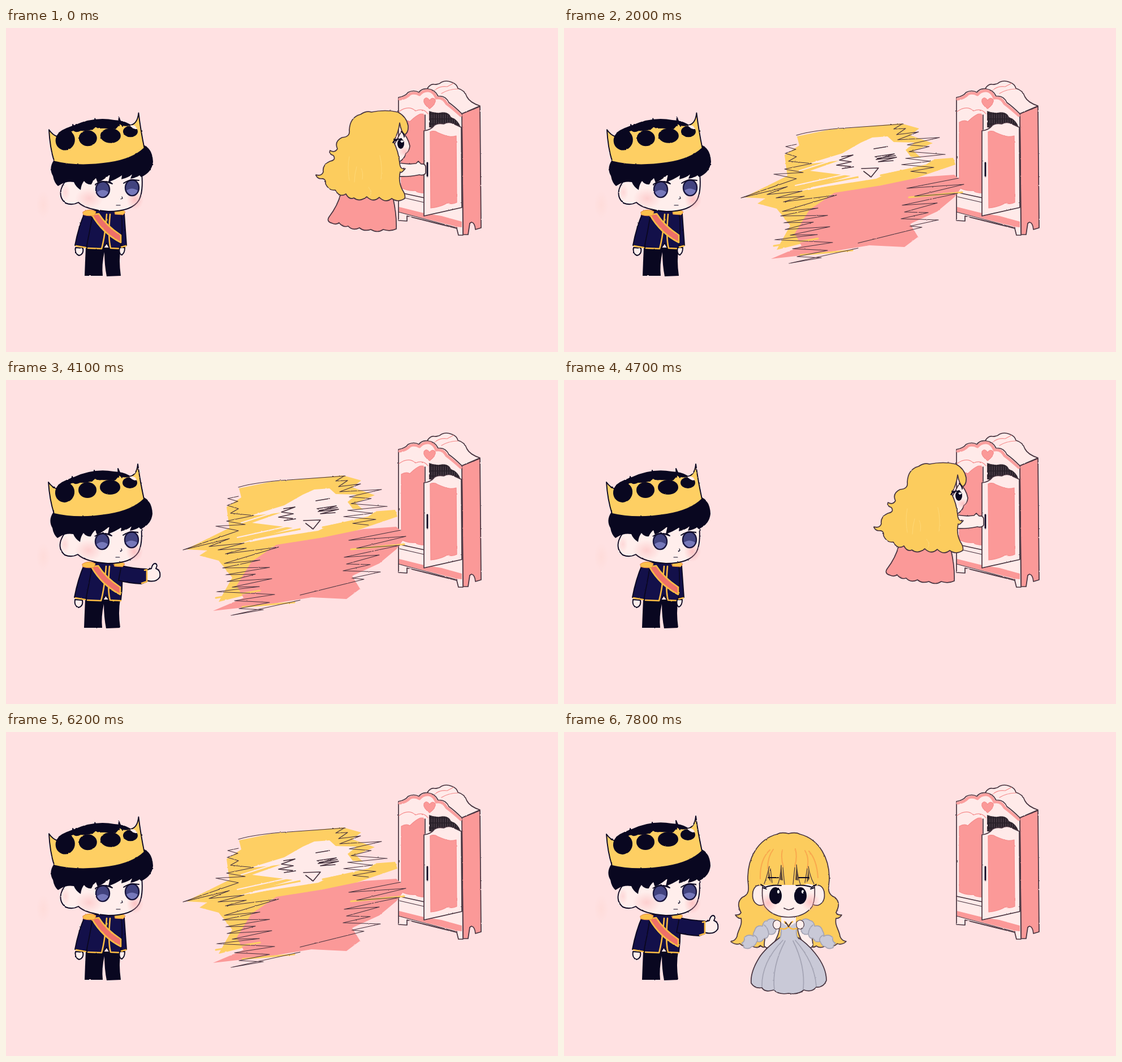
Animation of 976 by 574 pixels, one loop 8 s. Source, as an HTML page:

```html
<!DOCTYPE html>
<html lang="en">
<head>
<meta charset="utf-8">
<title>Dress up</title>
<style>
html, body { margin: 0; width: 100%; height: 100%; overflow: hidden; background: #ffe1e2; }
svg { display: block; width: 976px; height: 574px; }
svg * { stroke-linejoin: round; stroke-linecap: round; }
.ink { stroke: #0b0822; stroke-width: 1.9; fill: none; }
.soft { stroke: #46333f; stroke-width: 1.7; fill: none; }
.trim { stroke: #fcbc45; stroke-width: 2.6; fill: none; }
.fold { stroke: #f9a04a; stroke-width: 2; fill: none; opacity: .8; }
.seam { stroke: #a4a4b4; stroke-width: 1.7; fill: none; }
.edge { stroke: #f58b8b; stroke-width: 1.2; fill: none; }
.pale { fill: #ffeae9; }
.rose { fill: #fb9998; }
.dusk { fill: #e98290; }
.night { fill: #090720; }
.navy { fill: #13104a; }
.gold { fill: #fecf63; }
.hair { fill: #fccc5d; }
.grey { fill: #c9c9d7; }
.skin { fill: #ffeeec; }
.thin { stroke-width: 1.2; }
.bold { stroke-width: 2.8; }
</style>
</head>
<body>
<svg viewBox="0 0 976 574">
<defs>
  <filter id="rough0" x="-5%" y="-5%" width="110%" height="110%" color-interpolation-filters="sRGB">
    <feTurbulence type="fractalNoise" baseFrequency=".16" numOctaves="2" seed="3"/>
    <feDisplacementMap in="SourceGraphic" scale="1.8" xChannelSelector="R" yChannelSelector="G"/>
  </filter>
  <filter id="rough1" x="-5%" y="-5%" width="110%" height="110%" color-interpolation-filters="sRGB">
    <feTurbulence type="fractalNoise" baseFrequency=".16" numOctaves="2" seed="11"/>
    <feDisplacementMap in="SourceGraphic" scale="1.8" xChannelSelector="R" yChannelSelector="G"/>
  </filter>
  <radialGradient id="blush"><stop stop-color="#fba5a8" stop-opacity=".6"/><stop offset="1" stop-color="#fba5a8" stop-opacity="0"/></radialGradient>
  <radialGradient id="smudge"><stop stop-color="#ffd3cb" stop-opacity=".35"/><stop offset="1" stop-color="#ffd3cb" stop-opacity="0"/></radialGradient>
  <pattern id="hatch" width="4" height="9" patternUnits="userSpaceOnUse">
    <rect width="4" height="9" fill="#282029"/><path d="M1 0V7" stroke="#75616b" stroke-width=".7"/>
  </pattern>
</defs>

<ellipse cx="66" cy="313" rx="13" ry="25" fill="url(#smudge)"/>

<g id="wardrobe" filter="url(#rough0)">
  <path class="soft pale" d="M745 107Q751 98 758 100Q766 100 770 96Q778 92 788 96Q797 99 799 107Q811 110 815 122Q820 132 838 138L806 152L770 126Z"/>
  <path class="edge" d="M758 110Q768 102 780 104L791 98M770 116Q783 108 799 108"/>
  <path class="soft rose" d="M806 152L838 139L840 354L830 357Q829 345 823 344L820 346L817 366L808 366Z"/>
  <path class="soft pale" d="M694 123Q706 121 711 114Q721 109 730 114Q736 106 746 108Q759 109 764 121Q777 119 783 132Q793 139 806 152L808 367L800 367L797 355L709 333L709 342L694 341Z"/>
  <path d="M696 126Q708 124 714 117Q722 113 731 118Q738 110 747 111Q756 112 761 124Q773 122 779 134Q790 142 804 155" fill="none" stroke="#fb9f9e" stroke-width="5"/>
  <path class="edge" d="M695 148Q712 136 724 147Q738 141 746 152"/>
  <path class="edge rose" d="M749 143Q737 134 739 127Q743 120 749 128Q754 121 759 127Q761 134 749 143Z"/>
  <path fill="url(#hatch)" d="M748 147Q758 151 767 150Q782 147 787 158Q799 162 804 176L783 180L748 176Z"/>
  <path class="rose edge" d="M699 167Q708 162 714 166Q722 158 729 154Q735 150 739 154L740 292Q728 293 724 288Q710 289 699 283Z"/>
  <path class="soft" d="M694 291L740 301M741 154V180"/>
  <path class="rose" d="M695 317L739 328L770 333L806 343V353L797 352L695 326Z"/>
  <path class="soft thin" d="M696 299L739 309M694 326L798 354"/>
  <path class="soft pale" d="M739 182Q751 181 758 172Q765 168 774 170Q783 165 792 170L805 176L806 318L739 333Z"/>
  <path class="rose edge" d="M750 184Q757 181 763 185Q776 191 784 192Q789 193 796 191L797 309Q789 313 780 310Q769 317 751 319Z"/>
  <path class="ink bold" d="M745 239V262"/>
</g>

<g id="reach">
  <path class="soft rose" d="M592 293Q587 314 571 335Q566 343 577 346Q584 349 589 345Q596 354 605 351Q613 360 625 354Q633 361 645 357Q657 364 667 357Q679 361 690 356Q691 330 684 300Z"/>
  <path class="soft skin" d="M695 239Q711 242 725 240L729 236L734 241Q742 240 742 247V257Q739 262 731 260Q711 264 694 263Z"/>
  <path class="soft skin" d="M699 183Q711 193 714 209Q713 219 707 222Q705 231 696 237L682 215Z"/>
  <ellipse cx="705" cy="219" rx="11" ry="9" fill="url(#blush)"/>
  <path class="soft hair" d="M646 149Q671 144 693 149Q708 157 711 173Q712 185 705 189Q699 185 696 168Q694 186 685 201Q694 218 696 239Q697 252 706 249Q699 258 697 255Q693 272 701 287Q707 296 705 302Q693 310 682 302Q671 311 660 300Q649 310 638 299Q625 309 615 301Q607 305 601 294Q590 301 582 287Q571 289 565 276Q566 266 557 267Q550 267 548 260Q558 263 561 255Q559 242 573 236Q584 234 579 226Q570 223 573 217Q581 222 586 214Q580 201 594 194Q609 193 607 181Q608 158 627 153Q637 146 646 149Z"/>
  <path fill="none" stroke="#ffdf88" opacity=".6" d="M607 228Q603 246 607 270M620 246Q616 260 616 273M630 268Q632 255 628 249M661 226Q666 245 663 268M641 282Q649 292 642 299"/>
  <ellipse class="night" cx="698" cy="205" rx="6" ry="9"/>
  <circle cx="700" cy="201" r="2" fill="#fff"/>
  <path class="ink" d="M684 203Q690 196 699 196M686 197L691 199M700 184Q704 189 704 193"/>
</g>

<g id="front">
  <path id="lock" class="soft hair" d="M397 180Q410 177 417 181C452 190 470 225 469 262C468 275 464 287 479 293C489 302 485 312 481 320Q484 325 491 324Q487 331 481 330C478 343 487 351 488 362Q491 370 499 371Q492 378 483 375Q474 384 466 375Q456 386 446 379Q440 384 434 378L397 378"/>
  <use href="#lock" transform="translate(794) scale(-1 1)"/>
  <path id="arm" class="soft skin" d="M420 337L434 350Q440 365 440 379Q434 387 424 376Q413 358 413 346Z"/>
  <use href="#arm" transform="translate(794) scale(-1 1)"/>
  <path class="skin" d="M384 326H410V346H384Z"/>
  <g id="gold">
    <path class="soft dusk" d="M380 375L336 431L346 434L384 391L410 391L448 435L458 431L414 375Z"/>
    <path class="soft gold" d="M384 364Q374 397 346 434L339 441Q348 449 355 449Q361 456 371 454Q378 459 387 456Q397 461 408 457Q418 459 425 454Q437 455 441 448Q450 446 456 440L447 432Q423 399 411 364Z"/>
    <path class="fold" d="M387 368Q376 420 355 447M391 371Q382 425 374 452M395 371L393 456M401 371Q405 418 412 454M405 369Q418 420 429 450M409 370Q426 418 445 440"/>
    <path class="soft gold" d="M384 337Q389 338 392 335L397 342L402 335Q406 338 411 337Q412 351 411 365L384 365Q381 349 384 337Z"/>
    <path id="frill" class="soft gold" d="M416 333L434 331L439 348L431 354Q420 354 414 349Z"/>
    <use href="#frill" transform="translate(794) scale(-1 1)"/>
    <path class="fold" d="M423 338L428 350M431 336L434 347M371 338L366 350M363 336L360 347M390 347L392 360M403 347L401 360"/>
  </g>
  <g id="silver">
    <path class="soft grey" d="M383 363Q354 385 345 400Q329 426 331 445Q337 455 350 453Q355 462 371 457Q380 466 397 463Q414 466 424 457Q438 462 446 452Q459 453 464 440Q464 417 444 392Q430 374 412 363Z"/>
    <path class="seam" d="M387 369Q349 408 350 451M391 370Q367 416 372 457M405 370Q427 414 423 456M409 369Q443 408 446 450"/>
    <path class="grey" d="M383 337L397 345L412 337V366H383Z"/>
    <path class="seam" d="M383 345Q386 355 382 365M412 345Q409 355 413 365"/>
    <path class="trim" d="M379 346Q391 353 397 344Q403 353 415 346M390 336L397 343L404 336"/>
    <path class="soft" d="M392 337L397 345L402 337"/>
    <g id="puff">
      <path class="seam grey" d="M417 337Q426 327 435 334Q442 335 443 344Q454 341 457 352Q461 359 459 362Q468 357 475 364Q474 372 480 374Q475 379 476 382Q467 386 462 380Q456 380 453 371Q445 374 440 365Q434 367 432 358Q421 361 419 350Z"/>
      <path class="seam" d="M440 342Q433 347 432 358M458 360Q451 363 452 371"/>
    </g>
    <use href="#puff" transform="translate(794) scale(-1 1)"/>
  </g>
  <path id="fist" class="soft skin thin" d="M411 337Q417 330 423 336Q427 344 420 349Q412 350 411 343Z"/>
  <use href="#fist" transform="translate(794) scale(-1 1)"/>
  <path id="ear" class="soft skin" d="M440 273Q456 267 460 283Q463 302 449 307Q440 308 437 301Z"/>
  <use href="#ear" transform="translate(794) scale(-1 1)"/>
  <path class="soft skin" d="M352 266Q348 294 355 309Q369 328 397 328Q425 328 439 309Q446 292 442 266Z"/>
  <circle cx="361" cy="303" r="17" fill="url(#blush)"/><circle cx="436" cy="301" r="17" fill="url(#blush)"/>
  <path class="hair" d="M345 272L354 225Q397 198 440 225L449 272L430 269L424 271H366Z"/>
  <path class="fold" d="M347 260Q346 226 364 209M360 242Q360 221 370 208M388 239Q383 224 386 209M408 238Q413 222 409 207M430 242Q434 223 426 210M449 258Q447 226 433 211"/>
  <path class="soft thin" d="M363 238Q359 256 354 269M384 236Q383 258 378 270M387 240L390 270M411 235Q413 257 418 270M408 240L405 270M432 238Q435 257 442 269M365 242L368 267M430 242L426 267"/>
  <path fill="#3d2c30" opacity=".8" d="M362 243L366 267L361 258ZM384 235L387 263L382 262ZM411 235L414 263L409 262ZM432 242L434 260L429 267Z"/>
  <path class="ink" d="M348 270L356 275Q368 270 384 272M446 270L438 275Q426 270 410 272M352 276L358 278M442 276L436 278M361 258H379M415 258H433"/>
  <ellipse class="night" cx="374" cy="290" rx="11" ry="15"/><ellipse class="night" cx="418" cy="290" rx="11" ry="15"/>
  <ellipse cx="379" cy="283" rx="2" ry="3" fill="#fff"/><ellipse cx="422" cy="283" rx="2" ry="3" fill="#fff"/>
  <path class="soft" d="M389 312Q397 318 406 312"/>
</g>

<g id="smear" filter="url(#rough1)">
  <path class="gold" d="M412 192L470 180L596 169L628 178L612 190L652 204L618 218L636 234L688 230L692 242L610 270L470 296L440 330L420 382L376 393L400 350L376 320L342 311L356 302L318 300L395 262L390 225L416 208Z"/>
  <path class="rose" d="M478 292L560 279L632 264L690 260L708 276L690 300L660 325L612 347L626 370L602 388L540 385L455 399L366 409L420 386L408 364L434 322Z"/>
  <path class="pale" d="M430 241L492 222L525 203L545 194L572 192L583 202L620 203L604 216L613 228L655 232L640 242L573 257L552 267L436 285L404 292L507 262L435 253L486 235Z"/>
  <path fill="none" stroke="#fecf63" stroke-width="3" d="M418 402L510 394M371 386L449 373M610 300L704 291M410 286L520 264M560 261L680 237"/>
  <path fill="none" stroke="#ffeae9" stroke-width="2" d="M416 253L492 229M432 286L556 260M409 279L503 258"/>
  <path class="soft thin" d="M600 170L500 177Q440 181 411 190M411 206L392 210L410 215L391 222L411 228L397 236L438 240L390 250L423 256L371 259L411 267L313 301L395 281L359 295L421 289L375 301L425 298L388 308L482 296L386 325L449 319L383 333L466 332L389 345L441 344L391 357L470 352L400 367L448 366L373 375L475 380L404 391L466 394L412 405L455 407L398 417L520 390"/>
  <path class="soft thin" d="M598 170L583 179L604 178L588 189L627 184L590 198L664 194L607 207L646 210L610 219L674 224L604 231L648 236L597 242L654 247L613 254L641 257M698 266L606 284L707 277L620 298L696 293L598 314L660 310L602 326L644 327L596 338L662 340L612 351L633 353L520 381"/>
  <path class="soft" d="M491 228L511 225L487 234L508 237L482 243L512 246L492 249M548 214L572 210M550 228L584 223L552 233L588 229L556 237L582 235M554 231L586 226M526 249L556 248L543 264L530 254"/>
</g>

<g id="prince">
  <path class="night" d="M140 389H202Q198 411 202 439L177 440Q173 420 173 397Q168 419 170 439L138 439Q139 411 140 389Z"/>
  <path class="ink skin" d="M122 389L135 390Q137 401 128 403Q120 400 122 389Z"/>
  <path class="ink navy" d="M145 324L203 322Q208 353 203 390L183 391L177 381L170 391L142 390Z"/>
  <path class="ink navy" d="M138 328Q127 353 121 385L141 389Q147 361 152 331Z"/>
  <path class="trim" d="M123 386L140 389M144 390L168 391Q174 370 177 330M183 330Q179 372 184 390L203 391"/>
  <g id="armDown">
    <path class="ink skin" d="M200 389H209Q209 400 203 402Q198 399 200 389Z"/>
    <path class="ink navy" d="M203 328L208 329L212 385L202 387Q206 356 203 328Z"/>
    <path class="trim" d="M203 388L211 386"/>
  </g>
  <path d="M151 331L163 329Q176 350 202 367V380Q169 363 151 331Z" fill="#ee7069" stroke="#fcbc45" stroke-width="2.6"/>
  <g id="armThumb">
    <path class="ink skin" d="M247 337L257 334Q259 325 264 325Q269 327 265 334Q274 337 272 349Q265 360 248 355Z"/>
    <path class="ink navy" d="M204 329Q224 334 249 335L249 357L239 361Q217 360 199 355Z"/>
    <path class="trim" d="M245 337L249 336V357L240 360"/>
  </g>
  <path d="M135 326Q145 319 158 325L156 332Q144 334 136 331ZM191 324Q204 320 210 326L206 331L192 330Z" fill="#fcc04b" stroke="#e88842"/>
  <path class="ink skin" d="M118 262Q102 269 97 284Q92 300 104 310Q116 315 127 309Q140 322 180 325Q222 325 234 305Q242 290 239 258Z"/>
  <ellipse cx="146" cy="302" rx="25" ry="19" fill="url(#blush)" opacity=".7"/><ellipse cx="227" cy="304" rx="15" ry="18" fill="url(#blush)"/>
  <ellipse cx="104" cy="291" rx="9" ry="16" fill="url(#blush)" opacity=".5"/>
  <g fill="#42437f" stroke="#19163e" stroke-width="2.4">
    <ellipse cx="170" cy="286" rx="12" ry="14"/><ellipse cx="222" cy="283" rx="12" ry="14"/>
  </g>
  <path fill="#7678ba" d="M160 291Q170 283 180 291Q176 299 169 299Q163 298 160 291ZM212 288Q221 281 232 288Q229 296 221 296Q215 294 212 288Z"/>
  <path class="ink" d="M157 277Q167 270 183 273L187 276M207 275Q217 267 234 270M176 272L187 276"/>
  <path class="ink thin" d="M204 299L205 302L202 303M194 314H201"/>
  <path class="night" d="M84 234C78 242 76 252 82 262Q84 274 91 280L96 277Q106 271 119 273Q122 281 131 287Q132 277 137 271Q142 278 150 277Q153 270 158 266L161 274Q174 268 183 259L180 273Q194 268 204 261L203 268Q216 265 222 259L219 267Q230 265 235 261L238 264Q257 256 259 237Q258 215 244 208Z"/>
  <g id="crown">
    <path class="night" d="M88 200Q96 179 120 172Q155 156 190 162Q224 163 233 188L220 220H100Z"/>
    <path class="ink gold" d="M75 181Q82 191 91 193Q110 187 118 180Q122 186 131 181Q148 182 157 174Q166 179 175 174Q190 177 200 168Q205 173 216 171Q231 171 233 149Q237 179 244 211Q224 231 182 238Q127 247 85 237Q77 212 75 181Z"/>
    <g class="night">
      <ellipse cx="104" cy="199" rx="17" ry="18" transform="rotate(18 104 199)"/>
      <ellipse cx="144" cy="195" rx="16" ry="14"/>
      <ellipse cx="184" cy="190" rx="18" ry="13"/>
      <ellipse cx="219" cy="182" rx="13" ry="10"/>
      <path d="M92 186Q112 170 132 176Q121 185 104 183Q97 189 92 190ZM129 181Q142 169 159 173L152 180ZM167 177Q180 165 200 170L193 178Z"/>
    </g>
    <path class="ink" d="M117 181L117 171L122 182M155 176L156 160L161 176M199 172L198 157L205 173"/>
    <path class="skin" d="M218 172Q227 168 231 177Q227 180 218 172Z"/>
  </g>
</g>
</svg>
<script>
const LOOP = 8000, HALF = 4200, SMEAR = 2000, SHOW = 2100, END = 4100;
const el = id => document.getElementById(id);
const show = (id, on) => { el(id).style.display = on ? '' : 'none'; };
const rough = (id, n) => el(id).setAttribute('filter', `url(#rough${n})`);
const move = (id, v) => el(id).setAttribute('transform', v);

function pose(t) {
  const silver = t >= HALF, u = t % HALF;
  if (u < SMEAR) return { girl: 'reach', prince: Math.floor(u / 500) % 2, sway: Math.floor(u / 250) % 2 };
  if (u < SHOW) return { girl: 'smear', prince: 0 };
  if (u >= END) return { girl: 'smear', prince: 1, thumb: true };
  const beat = Math.floor((u - SHOW) / 500);
  return { girl: 'front', silver, prince: beat % 2, sway: beat % 2, thumb: beat > 1 };
}

let last = '';
function draw(now) {
  const p = pose(now % LOOP), key = JSON.stringify(p);
  if (key === last) return;
  last = key;
  for (const id of ['reach', 'front', 'smear']) show(id, id === p.girl);
  show('gold', !p.silver);
  show('silver', p.silver);
  show('armDown', !p.thumb);
  show('armThumb', p.thumb);
  rough('prince', p.prince);
  move('prince', p.prince ? '' : 'translate(1 0)');
  move('crown', p.prince ? '' : 'translate(-.5 .5) rotate(.8 160 215)');
  if (p.girl !== 'smear') rough(p.girl, p.sway);
  move('reach', p.sway ? 'rotate(.5 640 330)' : '');
}

const start = performance.now();
function frame(now) {
  draw(Math.max(0, now - start));
  requestAnimationFrame(frame);
}
draw(0);
requestAnimationFrame(frame);
</script>
</body>
</html>
```
